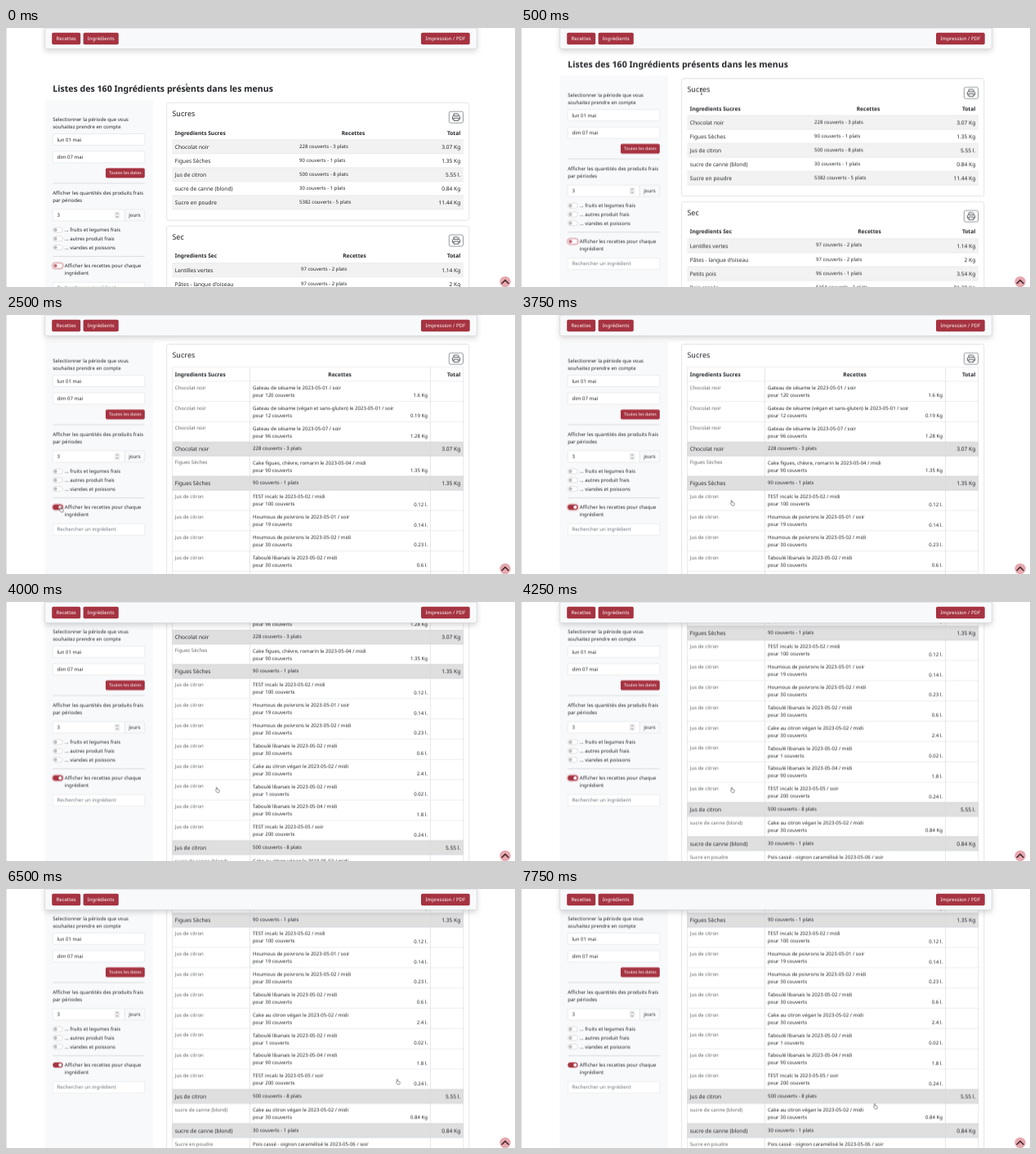
Write an HTML page that moves like this. It is 623x317 px and loops after 8 s.

```html
<!DOCTYPE html>
<html lang="fr">
<head>
<meta charset="utf-8">
<title>Ingrédients</title>
<style>
html, body { margin: 0; width: 100%; height: 100%; overflow: hidden; background: #fff; }
svg { display: block; width: 623px; height: 317px; }
text { font-family: "Noto Sans", sans-serif; text-rendering: geometricPrecision; white-space: pre; }
.nav { filter: drop-shadow(0 3px 3px rgba(0, 0, 0, .15)); }

.page, .side, .compact, .detail, .off, .on, .ring, .mark, .cursor, .beam, .hand {
  animation: 8s step-end infinite;
}
.page { animation-name: page; }
.side { animation-name: side; }
.compact, .off { animation-name: before; }
.detail, .on { animation-name: after; }
.ring { animation-name: ring; }
.mark { animation-name: mark; }
.cursor { animation-name: cursor; }
.beam { animation-name: beam; }
.hand { animation-name: hand; }

@keyframes page {
  0% { transform: translateY(0); }
  3.125% { transform: translateY(-14px); }
  6.25% { transform: translateY(-29.7px); }
  9.375% { transform: translateY(-55.8px); }
  50% { transform: translateY(-176.8px); }
  53.125%, 100% { transform: translateY(-223.6px); }
}
@keyframes side {
  0% { transform: translateY(0); }
  3.125% { transform: translateY(-14px); }
  6.25% { transform: translateY(-29.7px); }
  9.375% { transform: translateY(-55.8px); }
  50%, 100% { transform: translateY(-75.6px); }
}
@keyframes before { 0% { opacity: 1; } 31.25%, 100% { opacity: 0; } }
@keyframes after { 0% { opacity: 0; } 31.25%, 100% { opacity: 1; } }
@keyframes ring { 0% { opacity: 1; } 59.375%, 100% { opacity: 0; } }
@keyframes beam { 0% { opacity: 1; } 9.375%, 100% { opacity: 0; } }
@keyframes hand { 0% { opacity: 0; } 9.375%, 100% { opacity: 1; } }
@keyframes mark {
  0% { x: 348px; width: 0; }
  62.5% { x: 326px; width: 22px; }
  65.625% { x: 305.8px; width: 42px; }
  75%, 100% { x: 348px; width: 0; }
}
@keyframes cursor {
  0% { transform: translate(221px, 72px); }
  3.125% { transform: translate(221px, 74px); }
  6.25% { transform: translate(221px, 78px); }
  9.375% { transform: translate(190px, 142px); }
  12.5% { transform: translate(132px, 212px); }
  15.625% { transform: translate(95px, 254px); }
  18.75% { transform: translate(84px, 248px); }
  21.875% { transform: translate(74px, 241px); }
  25% { transform: translate(68px, 238px); }
  43.75% { transform: translate(160px, 236px); }
  46.875% { transform: translate(259px, 230px); }
  56.25% { transform: translate(338px, 174px); }
  59.375% { transform: translate(349px, 157px); }
  62.5% { transform: translate(327px, 157px); }
  65.625% { transform: translate(307px, 157px); }
  68.75% { transform: translate(385px, 163px); }
  71.875% { transform: translate(416px, 170px); }
  75% { transform: translate(440px, 190px); }
  78.125% { transform: translate(462px, 214px); }
  81.25% { transform: translate(480px, 236px); }
  84.375% { transform: translate(492px, 250px); }
  87.5% { transform: translate(497px, 254px); }
  90.625% { transform: translate(476px, 257px); }
  93.75% { transform: translate(452px, 262px); }
  96.875%, 100% { transform: translate(434px, 266px); }
}
</style>
</head>
<body>
<svg viewBox="0 0 623 317"></svg>
<script>
const RED = '#a63341', INK = '#212529', GREY = '#5f6468', LINE = '#dee2e6';
const SMALL = 6.05, CELL = 6.65;
const svg = document.querySelector('svg');

function add(parent, tag, attrs = {}, content = '') {
  const node = document.createElementNS('http://www.w3.org/2000/svg', tag);
  for (const key in attrs) node.setAttribute(key, attrs[key]);
  node.textContent = content;
  return parent.appendChild(node);
}
const group = (parent, name) => add(parent, 'g', { class: name });
const box = (parent, x, y, width, height, fill, more) =>
  add(parent, 'rect', { x, y, width, height, fill, ...more });
const line = (parent, d, stroke = LINE, width = .6, more) =>
  add(parent, 'path', { d, stroke, 'stroke-width': width, fill: 'none', ...more });
// y is the middle of the capitals
const label = (parent, x, y, content, size = SMALL, more) =>
  add(parent, 'text', { x, y: y + size * .36, 'font-size': size, fill: INK, ...more }, content);
const END = { 'text-anchor': 'end' }, MID = { 'text-anchor': 'middle' };
const BOLD = { 'font-weight': 700 };

function button(parent, x, y, w, h, content, size = SMALL) {
  box(parent, x, y, w, h, RED, { rx: 1.8 });
  label(parent, x + w / 2, y + h / 2, content, size, { ...MID, fill: '#fff' });
}

function field(parent, y, w, content, fill = INK) {
  box(parent, 57.3, y, w, 14, '#fff', { rx: 1.6, stroke: LINE, 'stroke-width': .6 });
  label(parent, 62.5, y + 7, content, SMALL, { fill });
}

function toggle(parent, y, stroke, dot, fill = '#fff', cx = 60.5) {
  box(parent, 57.4, y - 3, 12, 6, fill, { rx: 3, stroke, 'stroke-width': .45 });
  add(parent, 'circle', { cx, cy: y, r: 2.1, fill: dot });
}

function sidebar() {
  const g = group(svg, 'side');
  box(g, 47.5, 87.8, 132.5, 400, '#f8f9fb');
  label(g, 57.2, 112.2, 'Selectionner la période que vous');
  label(g, 57.2, 121.2, 'souhaitez prendre en compte');
  field(g, 129.5, 112.5, 'lun 01 mai');
  field(g, 151, 112.5, 'dim 07 mai');
  button(g, 122, 171.5, 47.8, 12, 'Toutes les dates', 5.29);
  line(g, 'M57.3 190H169.8', '#c8cacc');
  label(g, 57.2, 201.5, 'Afficher les quantités des produits frais');
  label(g, 57.2, 210.5, 'par périodes');
  box(g, 145, 222, 24.8, 14, '#f8f9fa', { rx: 1.6, stroke: LINE, 'stroke-width': .6 });
  field(g, 222, 87.7, '3');
  label(g, 157.4, 229, 'jours', SMALL, MID);
  box(g, 132.6, 224.6, 7, 8.8, '#efefef');
  line(g, 'M134.8 227.8L136.1 226.3L137.4 227.8M134.8 230.2L136.1 231.7L137.4 230.2', '#777', .8);
  ['... fruits et legumes frais', '... autres produit frais', '... viandes et poissons'].forEach((name, i) => {
    const y = 247.2 + i * 10.7;
    toggle(g, y, 'rgba(0,0,0,.25)', '#bcbdbe');
    label(g, 71.8, y, name);
  });
  line(g, 'M57.3 279.6H169.8', '#c8cacc');
  box(group(g, 'ring'), 55.6, 286.2, 15.6, 9.6, '#e9ccd0', { rx: 4.8 });
  toggle(group(g, 'off'), 291, '#c9747f', '#bf6975');
  toggle(group(g, 'on'), 291, RED, '#fff', RED, 66.3);
  label(g, 71.8, 291, 'Afficher les recettes pour chaque');
  label(g, 71.8, 300, 'ingrédient');
  field(g, 311.3, 112.5, 'Rechercher un ingrédient', '#6c757d');
}

function card(parent, y, h, name) {
  box(parent, 196.6, y, 370.2, h, '#fff', { rx: 2.4, stroke: '#d9dadb', 'stroke-width': .7 });
  label(parent, 203.4, y + 13.4, name, 9.07);
  box(parent, 542.3, y + 10.6, 17.2, 14, '#fff', { rx: 2, stroke: '#6c757d', 'stroke-width': .7 });
  const p = add(parent, 'g', { transform: `translate(551 ${y + 17.6})` });
  line(p, 'M-3 -1.5V-4.2H2.3L3 -3.5V-1.5M-3 2.2H-4.6V-.5Q-4.6 -1.5 -3.6 -1.5H3.6Q4.6 -1.5 4.6 -.5V2.2H3M-3 1H3V4.2H-3Z', '#4b5055', .9);
}

function heads(parent, y, name, mid) {
  label(parent, 206.8, y, 'Ingredients ' + name, CELL, BOLD);
  label(parent, mid, y, 'Recettes', CELL, { ...BOLD, ...MID });
  label(parent, 556.3, y, 'Total', CELL, { ...BOLD, ...END });
}

const plates = (people, n) => `${people} couverts - ${n} plats`;

function compact(parent, y, h, name, x, mid, rows) {
  card(parent, y, h, name);
  heads(parent, y + 36.6, name, mid);
  rows.forEach(([item, people, n, sum], i) => {
    const top = y + 45.2 + i * 17.04, mid = top + 8.6;
    if (i % 2 == 0) box(parent, 203.4, top, 356.6, 17, '#f2f2f2');
    line(parent, `M203.4 ${top}H560`);
    label(parent, 206.8, mid, item, CELL);
    label(parent, x, mid - 1, plates(people, n), 6.03);
    label(parent, 556.3, mid, sum, CELL, END);
  });
  const end = y + 45.2 + rows.length * 17.04;
  line(parent, `M203.4 ${end}H560`);
}

function detail(parent) {
  const list = [
    ['Chocolat noir', 228, '3.07 Kg', [
      ['Gateau de sésame', '01 / soir', 120, '1.6 Kg'],
      ['Gateau de sésame (végan et sans-gluten)', '01 / soir', 12, '0.19 Kg'],
      ['Gateau de sésame', '07 / soir', 96, '1.28 Kg']]],
    ['Figues Sèches', 90, '1.35 Kg', [
      ['Cake figues, chèvre, romarin', '04 / midi', 90, '1.35 Kg']]],
    ['Jus de citron', 500, '5.55 l.', [
      ['TEST incalc', '02 / midi', 100, '0.12 l.'],
      ['Houmous de poivrons', '01 / soir', 19, '0.14 l.'],
      ['Houmous de poivrons', '02 / midi', 30, '0.23 l.'],
      ['Taboulé libanais', '02 / midi', 30, '0.6 l.'],
      ['Cake au citron végan', '02 / midi', 30, '2.4 l.'],
      ['Taboulé libanais', '02 / midi', 1, '0.02 l.'],
      ['Taboulé libanais', '04 / midi', 90, '1.8 l.'],
      ['TEST incalc', '05 / soir', 200, '0.24 l.']]],
    ['sucre de canne (blond)', 30, '0.84 Kg', [
      ['Cake au citron végan', '02 / midi', 30, '0.84 Kg']]],
    ['Sucre en poudre', 5382, '11.44 Kg', [
      ['Pois cassé - oignon caramélisé', '06 / soir', 5000, '10.6 Kg']]]
  ];
  card(parent, 91.6, 520, 'Sucres');
  heads(parent, 128.2, 'Sucres', 408.6);
  line(parent, 'M203.4 119.6H560');
  box(parent, 305.8, 373.6, 0, 8, '#76b3b0', { class: 'mark' });
  let y = 136.8;
  for (const [item, people, sum, dishes] of list) {
    for (const [dish, day, n, part] of dishes) {
      line(parent, `M203.4 ${y}H560`);
      label(parent, 206.8, y + 7.8, item, SMALL, { fill: GREY });
      const t = label(parent, 302, y + 8.1, '');
      add(t, 'tspan', { 'font-weight': 500 }, dish);
      t.append(` le 2023-05-${day}`);
      label(parent, 302, y + 17, `pour ${n} couverts`);
      label(parent, 516, y + 17.3, part, SMALL, { ...END, 'font-weight': 500 });
      y += 24.83;
    }
    box(parent, 203.4, y, 356.6, 17.05, '#dfdfe0');
    line(parent, `M203.4 ${y}H560M203.4 ${y + 17.05}H560`, '#c6c8ca');
    label(parent, 206.8, y + 8.7, item, CELL);
    label(parent, 302, y + 7.6, plates(people, dishes.length), 6.03);
    label(parent, 556.3, y + 8.7, sum, CELL, END);
    y += 17.05;
  }
  line(parent, `M203.6 119.6V${y}M298.5 119.6V${y}M519.5 119.6V${y}M559.8 119.6V${y}`, '#d5d8db');
}

function page() {
  const g = group(svg, 'page');
  label(g, 57.2, 74, 'Listes des 160 Ingrédients présents dans les menus', 10.6, BOLD);
  const short = group(g, 'compact');
  compact(short, 91.6, 143.8, 'Sucres', 359, 425, [
    ['Chocolat noir', 228, 3, '3.07 Kg'],
    ['Figues Sèches', 90, 1, '1.35 Kg'],
    ['Jus de citron', 500, 8, '5.55 l.'],
    ['sucre de canne (blond)', 30, 1, '0.84 Kg'],
    ['Sucre en poudre', 5382, 5, '11.44 Kg']]);
  compact(short, 242.5, 300, 'Sec', 361, 426.5, [
    ['Lentilles vertes', 97, 2, '1.14 Kg'],
    ['Pâtes - langue d\'oiseau', 97, 2, '2 Kg'],
    ['Petits pois', 96, 1, '3.54 Kg'],
    ['Pois cassés', 5154, 2, '81.38 Kg'],
    ['Pois chiches', 146, 4, '1.88 Kg']]);
  detail(group(g, 'detail'));
}

function frame() {
  box(svg, 0, 0, 1, 317, '#e0e0e0');
  const nav = group(svg, 'nav');
  box(nav, 47.6, -4, 528.8, 29.6, '#f8f9fb', { rx: 2.6, stroke: '#d3d5d8', 'stroke-width': .7 });
  line(nav, 'M47.6 .3H576.4', '#d3d5d8');
  button(svg, 56.2, 5.8, 35, 14.5, 'Recettes');
  button(svg, 94.6, 5.8, 43.2, 14.5, 'Ingrédients');
  button(svg, 508, 5.8, 59.7, 14.5, 'Impression / PDF');
  add(svg, 'circle', { cx: 611, cy: 310.6, r: 6.7, fill: '#e5a9af' });
  line(svg, 'M606.6 313L611 308.6L615.4 313', '#4d2a2e', 1.7);
}

function pointer() {
  const c = group(svg, 'cursor');
  line(group(c, 'beam'), 'M-1.2 -3.4H1.2M0 -3.4V3.4M-1.2 3.4H1.2', '#444', .7);
  add(group(c, 'hand'), 'path', {
    d: 'M-1.8 -2.9Q-1.2 -3.8 -.6 -2.9V-.7L1.6 -.2Q2.4 0 2.3 .9L1.8 3.2H-.8L-2.4 .9Q-2.5 .1 -1.8 .3Z',
    fill: '#fff', stroke: '#555', 'stroke-width': .6, 'stroke-linejoin': 'round'
  });
}

sidebar();
page();
frame();
pointer();
</script>
</body>
</html>
```
